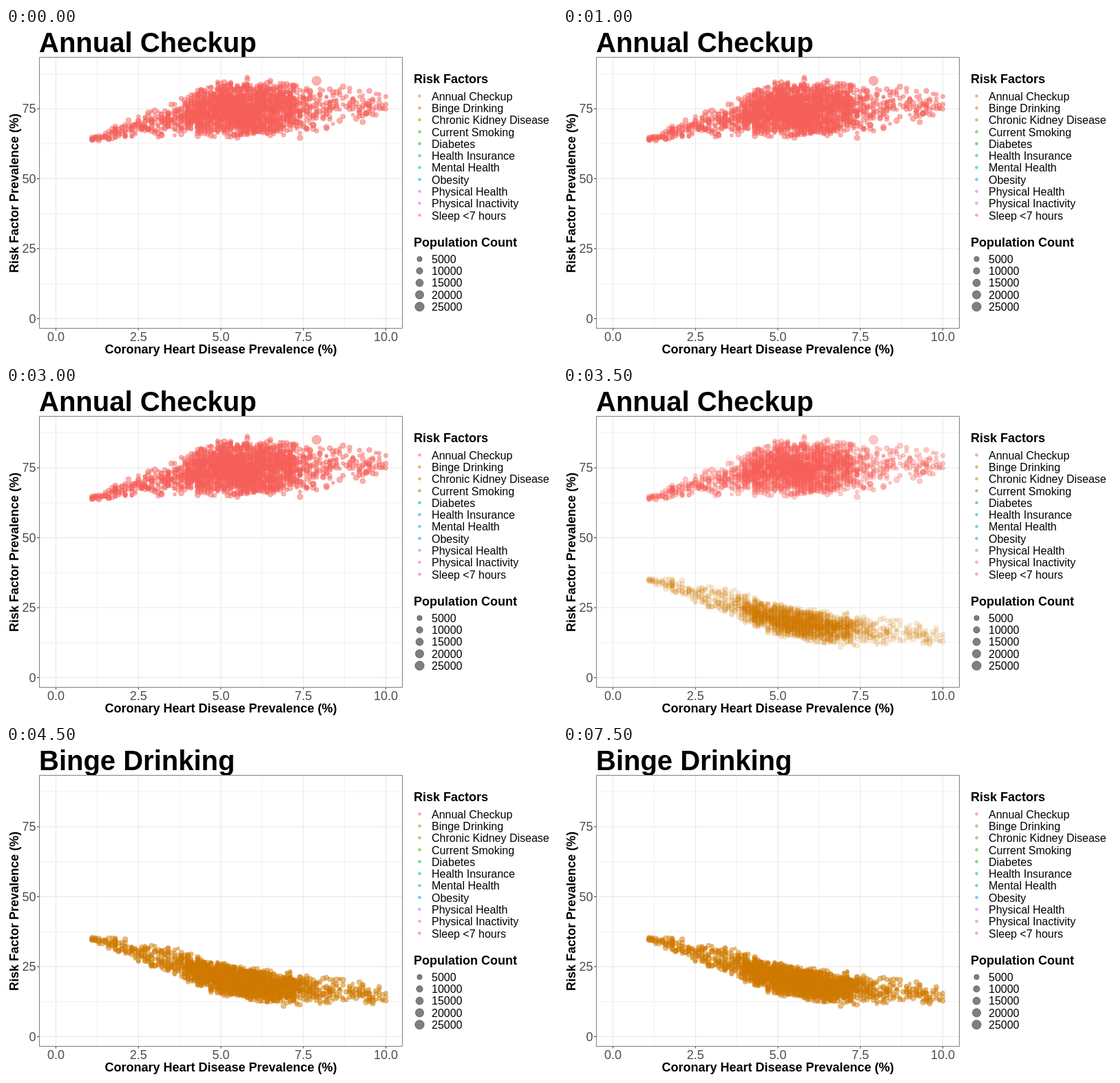
Write an HTML page with a canvas that moves like this. It is 800 px wide and 480 px high and loops after 8 s.

```html
<!DOCTYPE html>
<html lang="en">
<head>
<meta charset="utf-8">
<title>Risk factors and coronary heart disease</title>
<style>
  html, body { margin: 0; width: 800px; height: 480px; overflow: hidden; background: #fff; }
  svg, canvas { position: absolute; left: 0; top: 0; }
  text { font-family: "Liberation Sans", Arial, sans-serif; font-size: 16px; }
  .tick { font-size: 18px; fill: #4d4d4d; }
  .head { font-size: 18px; font-weight: bold; }
  #title { font-size: 40px; font-weight: bold; }
  .mid { text-anchor: middle; }
  .end { text-anchor: end; }
</style>
</head>
<body>
<svg id="chart" width="800" height="480">
  <text id="title" x="48" y="35"></text>
  <text class="head mid" x="312" y="472">Coronary Heart Disease Prevalence (%)</text>
  <text class="head mid" transform="translate(18 239.5) rotate(-90)">Risk Factor Prevalence (%)</text>
  <text class="head" x="592" y="80">Risk Factors</text>
  <text class="head" x="592" y="317">Population Count</text>
</svg>
<canvas id="dots" width="800" height="480"></canvas>
<script>
const chart = document.getElementById('chart');
const title = document.getElementById('title');
const ctx = document.getElementById('dots').getContext('2d');
const px = v => 72.5 + 47.9 * v;
const py = v => 421.4 - 4.057 * v;
const radius = population => 1.3 + 2.4 * Math.sqrt(population / 5000);

function add(name, attrs, text = '') {
  const node = document.createElementNS('http://www.w3.org/2000/svg', name);
  for (const key in attrs) node.setAttribute(key, attrs[key]);
  node.textContent = text;
  chart.append(node);
}
const path = (d, stroke, width = 1) => add('path', { d, stroke, fill: 'none', 'stroke-width': width });
const label = (x, y, text, style = '') => add('text', { x, y, class: style }, text);
const disc = (cx, cy, r, color) => add('circle', {
  cx, cy, r, fill: color, stroke: color, 'stroke-width': 0.75, 'fill-opacity': 0.5, 'stroke-opacity': 0.5
});

// Grid: thin lines halfway between the labelled ones
const columns = [0, 2.5, 5, 7.5, 10];
const rows = [0, 25, 50, 75];
const vertical = (v, color, width) => path(`M${px(v)} 42V435`, color, width);
const horizontal = (v, color, width) => path(`M48 ${py(v)}H575`, color, width);
columns.slice(0, 4).forEach(v => vertical(v + 1.25, '#ececec', 0.8));
rows.forEach(v => horizontal(v + 12.5, '#ececec', 0.8));
columns.forEach(v => vertical(v, '#e6e6e6'));
rows.forEach(v => horizontal(v, '#e6e6e6'));

// Ticks and frame
for (const v of columns) {
  path(`M${px(v)} 435V438.5`, '#333');
  label(px(v), 454, v.toFixed(1), 'tick mid');
}
for (const v of rows) {
  path(`M45 ${py(v)}H48`, '#333');
  label(43.5, py(v) + 6.2, v, 'tick end');
}
path('M48.5 42.5H575.5V435.5H48.5Z', '#7f7f7f');

// Legends
const factors = [
  ['Annual Checkup', '#f6605a'], ['Binge Drinking', '#d07a00'],
  ['Chronic Kidney Disease', '#9f9300'], ['Current Smoking', '#52a500'],
  ['Diabetes', '#00b24c'], ['Health Insurance', '#00b796'],
  ['Mental Health', '#00aed8'], ['Obesity', '#0096ff'],
  ['Physical Health', '#a673ff'], ['Physical Inactivity', '#ec53e8'],
  ['Sleep <7 hours', '#ff4fa6']
];
const lineHeight = 17.28;
factors.forEach(([name, color], i) => {
  const y = 98.6 + lineHeight * i;
  disc(600.5, y, 1.9, color);
  label(618, y + 6.16, name);
});
for (let i = 0; i < 5; i++) {
  const y = 335 + lineHeight * i;
  const population = 5000 * (i + 1);
  disc(600.5, y, radius(population), '#000');
  label(618, y + 5.76, population);
}

let seed = 20;
function rnd() {
  seed = (seed * 1664525 + 1013904223) % 4294967296;
  return seed / 4294967296;
}

// Key points of each cloud: disease prevalence, middle of the band, half its height
const bands = [
  [[1, 64, 1], [3, 70.3, 5], [5, 75, 10.5], [6.5, 75, 10.5], [9.3, 75.5, 8], [10, 77, 3]],
  [[1, 35.5, 1.5], [3, 28.5, 5], [5, 20.6, 6.2], [6.5, 17.7, 6.2], [9.3, 15.6, 5], [10, 14.5, 3]]
];
function sample(band, x) {
  const i = Math.max(1, band.findIndex(p => p[0] >= x));
  const [a, b] = [band[i - 1], band[i]];
  const t = (x - a[0]) / (b[0] - a[0]);
  const mix = k => a[k] + t * (b[k] - a[k]);
  const stray = rnd() < 0.03 ? 1.3 : 1;
  return mix(1) + mix(2) * stray * (rnd() + rnd() - 1);
}

// Most places lie near the middle, some in a tail on either side
function prevalence() {
  const kind = rnd();
  if (kind < 0.14) return 4.5 - 3.4 * rnd() ** 1.6;
  if (kind < 0.23) return 7 + 3 * rnd() ** 1.6;
  return 5.6 + 1.6 * (rnd() + rnd() + rnd() + rnd() - 2);
}
const places = Array.from({ length: 2200 }, () => {
  const x = Math.round(10 * prevalence()) / 10;
  const u = rnd();
  return { x, r: radius(1000 + 4000 * u + 2500 * u * u), y: bands.map(b => sample(b, x)) };
});
places.push({ x: 7.9, r: radius(25000), y: [85, 16] });

function drawCloud(i, alpha) {
  ctx.globalAlpha = alpha;
  ctx.fillStyle = ctx.strokeStyle = factors[i][1];
  ctx.lineWidth = 0.75;
  for (const { x, y, r } of places) {
    ctx.beginPath();
    ctx.arc(px(x), py(y[i]), r, 0, 2 * Math.PI);
    ctx.fill();
    ctx.stroke();
  }
}

// The picture moves in half-second steps; the clouds cross-fade over three of them
const start = performance.now();
let shown = -1;
function frame() {
  const step = Math.floor((performance.now() - start) % 8000 / 500);
  const fade = Math.min(3, Math.max(0, step - 6)) / 3;
  if (fade !== shown) {
    shown = fade;
    title.textContent = factors[fade < 1 ? 0 : 1][0];
    ctx.clearRect(0, 0, 800, 480);
    drawCloud(0, 0.5 * (1 - fade));
    drawCloud(1, 0.5 * fade);
  }
  requestAnimationFrame(frame);
}
frame();
</script>
</body>
</html>
```
